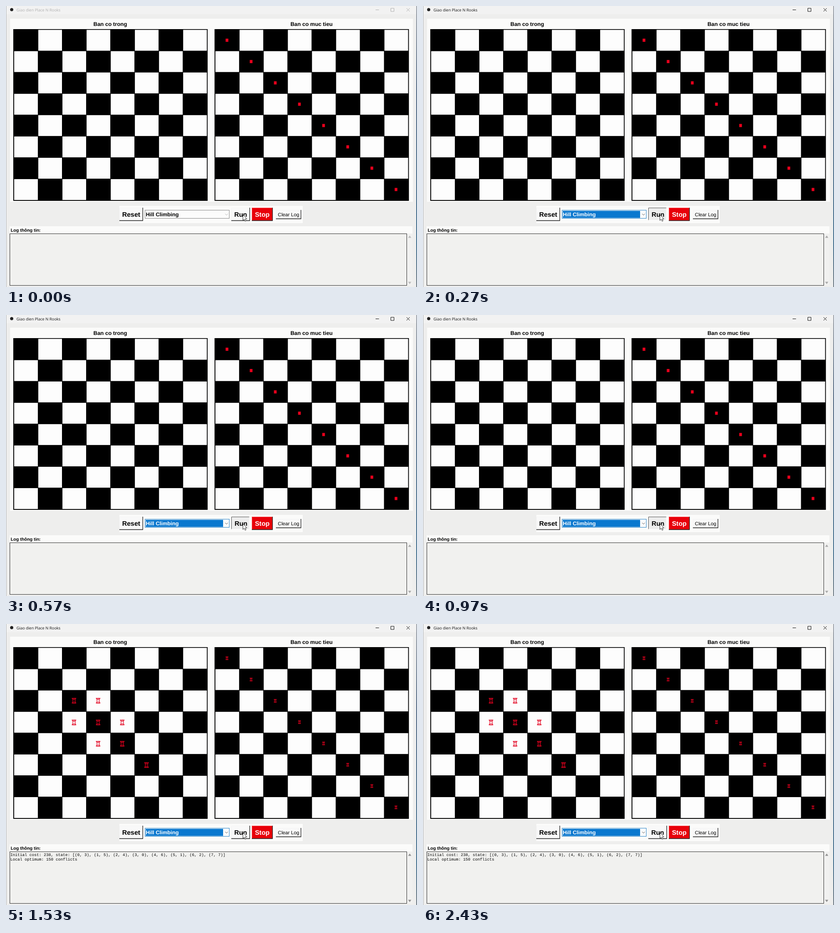
Write an HTML page that moves like this. It is 903 px wide and 620 px high and loops after 2.46 s.

```html
<!DOCTYPE html>
<html lang="vi">
<head>
<meta charset="utf-8">
<style>
  html, body { margin: 0; width: 100%; height: 100%; overflow: hidden; background: #eeeeed; }
  svg { display: block; }
  text { font-family: "Liberation Sans", Arial, sans-serif; white-space: pre; text-rendering: geometricPrecision; }
  .b { font-weight: bold; }
  .mid { text-anchor: middle; }
  .log { font: 8.75px "Liberation Mono", "Courier New", monospace; }
  .title { font: 8.6px "Open Sans", "Noto Sans", sans-serif; }
  .rook { font-family: "DejaVu Sans", sans-serif; fill: #e2001f; stroke: #e2001f; stroke-width: .5; }
</style>
</head>
<body>
<svg id="stage" width="903" height="620" viewBox="0 0 903 620">
  <defs>
    <linearGradient id="edge" x2="0" y2="1">
      <stop offset="0" stop-color="#8d939c"/>
      <stop offset=".3" stop-color="#2a4668"/>
      <stop offset=".85" stop-color="#174f78"/>
      <stop offset="1" stop-color="#55616c"/>
    </linearGradient>
  </defs>

  <!-- window -->
  <rect width="903" height="620" fill="#eeeeed"/>
  <rect width="903" height="18" fill="#f2f2f2"/>
  <path d="M.5 0V620" stroke="#b4b8bc"/>
  <rect x="901.5" width="1.5" height="620" fill="url(#edge)"/>
  <circle cx="12.5" cy="8" r="3.5" fill="#222"/>
  <g id="caption">
    <text class="title" x="23" y="12" fill="currentColor">Giao dien Place N Rooks</text>
    <path d="M812 8.5H819.5M845.5 5H852.5V12H845.5ZM880 5L887 12M887 5L880 12" fill="none" stroke="currentColor"/>
  </g>

  <!-- panels -->
  <g fill="#fbfbfa">
    <rect x="9" y="28" width="885" height="404"/>
    <rect x="249" y="441" width="403" height="38"/>
    <rect x="8" y="486" width="885" height="16"/>
  </g>
  <text class="b mid" x="229" y="43.6" font-size="12">Ban co trong</text>
  <text class="b mid" x="671.3" y="43.6" font-size="12">Ban co muc tieu</text>
  <g id="boards"></g>
  <g id="found"></g>
  <g id="dots" fill="#e8001c"></g>
  <g id="goal"></g>

  <!-- controls -->
  <g id="buttons"></g>
  <rect id="combo" x="305.5" y="450.5" width="185" height="18" fill="#fcfcfc"/>
  <rect id="select" x="307" y="452" width="170" height="15.5" fill="#0a78cf"/>
  <text id="choice" class="b" x="307.2" y="464.1" font-size="11.85">Hill Climbing</text>
  <path id="arrow" d="M481.5 458.5L484.5 461.5L487.5 458.5" fill="none"/>

  <!-- log -->
  <text class="b" x="10.3" y="497.6" font-size="9.8">Log thông tin:</text>
  <rect x="8.5" y="502.5" width="872" height="114" fill="#f1f1ef" stroke="#333"/>
  <rect x="881" y="502" width="12" height="115" fill="#f1f1f0"/>
  <path id="scroll" d="M883.5 511.5L887 506.5L890.5 511.5ZM883.5 608.5L887 613.5L890.5 608.5Z"/>
  <g id="lines">
    <text class="log" x="9.5" y="512">Initial cost: 238, state: [(0, 3), (1, 5), (2, 4), (3, 0), (4, 6), (5, 1), (6, 2), (7, 7)]</text>
    <text class="log" x="9.5" y="522.4">Local optimum: 150 conflicts</text>
  </g>

  <path d="M520.5 460.5V473.2L523.4 470.6L525.4 475L527.5 474L525.5 469.8H529.3Z" fill="#fff" stroke="#222" stroke-width=".9"/>
</svg>
<script>
const LOOP = 2460, PRESS = 60, RESULT = 1100;
const CW = 53.05, CH = 47.05, LEFT = 17.3, RIGHT = 459.5, TOP = 52;
const $ = id => document.getElementById(id);
const rect = (x, y, w, h, fill) =>
  `<rect x="${x}" y="${y}" width="${w}" height="${h}"${fill ? ` fill="${fill}"` : ''}/>`;
const center = (left, c, r) => [left + CW * (c + .5) - .5, TOP + CH * (r + .5)];
const rook = (left, c, r, size) => {
  const [x, y] = center(left, c, r);
  return `<text class="rook mid" x="${x}" y="${y + size * .365}" font-size="${size}">♖</text>`;
};

function board(left) {
  let out = rect(left - 1.3, TOP - 1, CW * 8 + 2.6, CH * 8 + 2.5, '#000');
  for (let r = 0; r < 8; r++)
    for (let c = 0; c < 8; c++)
      if ((r + c) % 2) out += rect(left + CW * c + .6, TOP + CH * r + .6, CW - 1, CH - 1, '#fdfdfd');
  return out;
}

function button(label, x, y, w, h, size, { fill = '#f9f9f9', color = '#000', weight = 'bold', sunken = false } = {}) {
  const lit = `M${x + .5} ${y + h}V${y + .5}H${x + w}`;
  const shade = `M${x} ${y + h - .5}H${x + w - .5}V${y}`;
  const d = sunken ? 1 : 0;
  return rect(x, y, w, h, sunken ? '#ededed' : fill) +
    `<g fill="none"><path d="${lit}" stroke="${sunken ? '#555' : color === '#fff' ? '#f55' : '#f4f4f4'}"/>` +
    `<path d="${shade}" stroke="${sunken ? '#fff' : '#222'}" stroke-width="1.3"/></g>` +
    `<text class="mid" x="${x + w / 2 + d}" y="${y + h / 2 + size * .36 + d * .6}" font-size="${size}" font-weight="${weight}" fill="${color}">${label}</text>`;
}

const diagonal = [...Array(8).keys()];
const spots = [[2, 2], [3, 2], [2, 3], [3, 3], [4, 3], [3, 4], [4, 4], [5, 5]];
$('boards').innerHTML = board(LEFT) + board(RIGHT);
$('found').innerHTML = spots.map(([c, r]) => rook(LEFT, c, r, 16)).join('');
$('goal').innerHTML = diagonal.map(i => rook(RIGHT, i, i, 9.5)).join('');
$('dots').innerHTML = diagonal.map(i => {
  const [x, y] = center(RIGHT, i, i);
  return rect(x - 3, y - 3.5, 6, 7);
}).join('');
$('buttons').innerHTML =
  button('Reset', 249, 445, 52, 29, 14.6) +
  `<g id="up">${button('Run', 495, 445, 41, 29, 14.4)}</g>` +
  `<g id="down">${button('Run', 495, 445, 40.5, 28.5, 14.4, { sunken: true })}</g>` +
  button('Stop', 540, 445, 46, 29, 14.4, { fill: '#e8000a', color: '#fff' }) +
  button('Clear Log', 593, 450, 55.5, 20, 10.8, { weight: 'normal' });

const show = (id, on) => $(id).setAttribute('visibility', on ? 'visible' : 'hidden');

function draw(now) {
  const t = now % LOOP, active = t >= PRESS, done = t >= RESULT;
  $('caption').style.color = active ? '#111' : '#b0b0b0';
  $('combo').setAttribute('stroke', active ? '#2f86c8' : '#8a8a8a');
  $('choice').setAttribute('fill', active ? '#fff' : '#000');
  $('arrow').setAttribute('stroke', active ? '#555' : '#b5b5b5');
  $('scroll').setAttribute('fill', done ? '#8f8f8f' : active ? '#a8a8a8' : '#bbb');
  show('select', active);
  show('down', active && !done);
  show('up', !active || done);
  show('found', done);
  show('goal', done);
  show('dots', !done);
  show('lines', done);
}

const start = performance.now();
function tick() {
  draw(performance.now() - start);
  requestAnimationFrame(tick);
}
tick();
</script>
</body>
</html>
```
